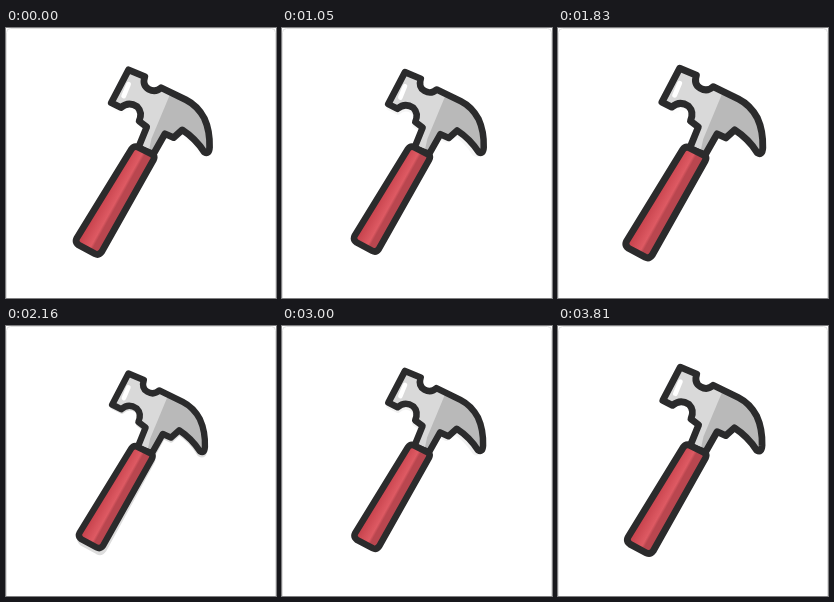
An HTML page that plays this animation: 270x270 px, repeating every 3840 ms.

```html
<!DOCTYPE html>
<html lang="en">
<head>
<meta charset="utf-8">
<title>Hammer</title>
<style>
  html, body { margin: 0; width: 100%; height: 100%; overflow: hidden; background: #fff; }
  svg { display: block; width: 100%; height: 100%; }
  .ink { fill: none; stroke: #2b2b2c; stroke-width: 7; stroke-linejoin: round; stroke-linecap: round; }
  #shadow use { fill: #c9c9c9; stroke: #c9c9c9; stroke-width: 6; stroke-linejoin: round; }
</style>
</head>
<body>
<svg viewBox="0 0 270 270">
  <defs>
    <path id="head" d="M120 41 L137 48 Q134 57 141 61 Q148 65 154 59.500 L180 72 Q192 78 199 91 Q205 104 204.500 121
      Q204 129 199 126 Q190 112 176 103 L167 111 L158 107 L146 128 L130 122 L139 100 L131 94 Q135 85 129 79 Q120 73 112 80 L102 75 Z"/>
    <path id="handle" d="M130 121 L144 128 Q148 130 146 134 L92 229 Q89 233 85 231 L68 222 Q64 219 66 215 L123 123 Q126 119 130 121 Z"/>
    <clipPath id="inHead"><use href="#head"/></clipPath>
    <clipPath id="inHandle"><use href="#handle"/></clipPath>
    <linearGradient id="red" gradientUnits="userSpaceOnUse" x1="94" y1="169" x2="119" y2="183">
      <stop offset=".1" stop-color="#c9454f"/>
      <stop offset=".52" stop-color="#de5a63"/>
      <stop offset=".62" stop-color="#b9464f"/>
    </linearGradient>
    <filter id="soft"><feGaussianBlur stdDeviation=".8"/></filter>
  </defs>
  <rect width="270" height="270" fill="#fff"/>
  <rect x=".5" y=".5" width="269" height="280" rx="4" fill="none" stroke="#dedede"/>
  <g id="shadow" filter="url(#soft)"><use href="#head"/><use href="#handle"/></g>
  <g id="hammer" filter="url(#soft)">
    <g clip-path="url(#inHead)">
      <path fill="#d9d9d9" d="M90 30h120v110H90z"/>
      <path fill="#b9b9b9" d="M168 55 L144 112 L140 130 H215 V55 Z"/>
      <path d="M120 56 L115 68" stroke="#fff" stroke-width="5" stroke-linecap="round"/>
    </g>
    <use href="#head" class="ink"/>
    <use href="#handle" fill="url(#red)"/>
    <use href="#handle" class="ink"/>
  </g>
</svg>
<script>
  const PERIOD = 960, STEP = 30, RAD = Math.PI / 180;
  const REST = { left: 62, top: 37.5, right: 208.5, bottom: 235 };
  const hammer = document.getElementById("hammer");
  const shadow = document.getElementById("shadow");

  const pulse = degrees => 0.5 + 0.5 * Math.cos(degrees * RAD);

  // Stretch the drawing so that its bounds meet the given edges.
  function fit(node, left, top, right, bottom) {
    const sx = (right - left) / (REST.right - REST.left);
    const sy = (bottom - top) / (REST.bottom - REST.top);
    node.setAttribute("transform",
      `matrix(${sx} 0 0 ${sy} ${left - sx * REST.left} ${top - sy * REST.top})`);
  }

  // The head and the grip swell in turn; the shadow runs ahead of both.
  function swell(phase) {
    return { head: pulse(phase + 23), grip: pulse(phase - 23) };
  }

  function draw(now) {
    const time = Math.floor(now / STEP) * STEP % PERIOD;
    const phase = -80 - 360 * time / PERIOD;
    const front = swell(phase), back = swell(phase - 80);
    fit(hammer, 70 - 8 * front.grip, 45 - 8.5 * front.head, 202 + 7 * front.head, 225 + 12 * front.grip);
    fit(shadow, 72 - 2 * back.grip, 46 - 3 * back.head, 201 + 8 * back.head, 222 + 14 * back.grip);
    shadow.setAttribute("opacity", pulse(phase - 115));
  }

  const start = performance.now();
  function tick() {
    draw(performance.now() - start);
    requestAnimationFrame(tick);
  }
  tick();
</script>
</body>
</html>
```
